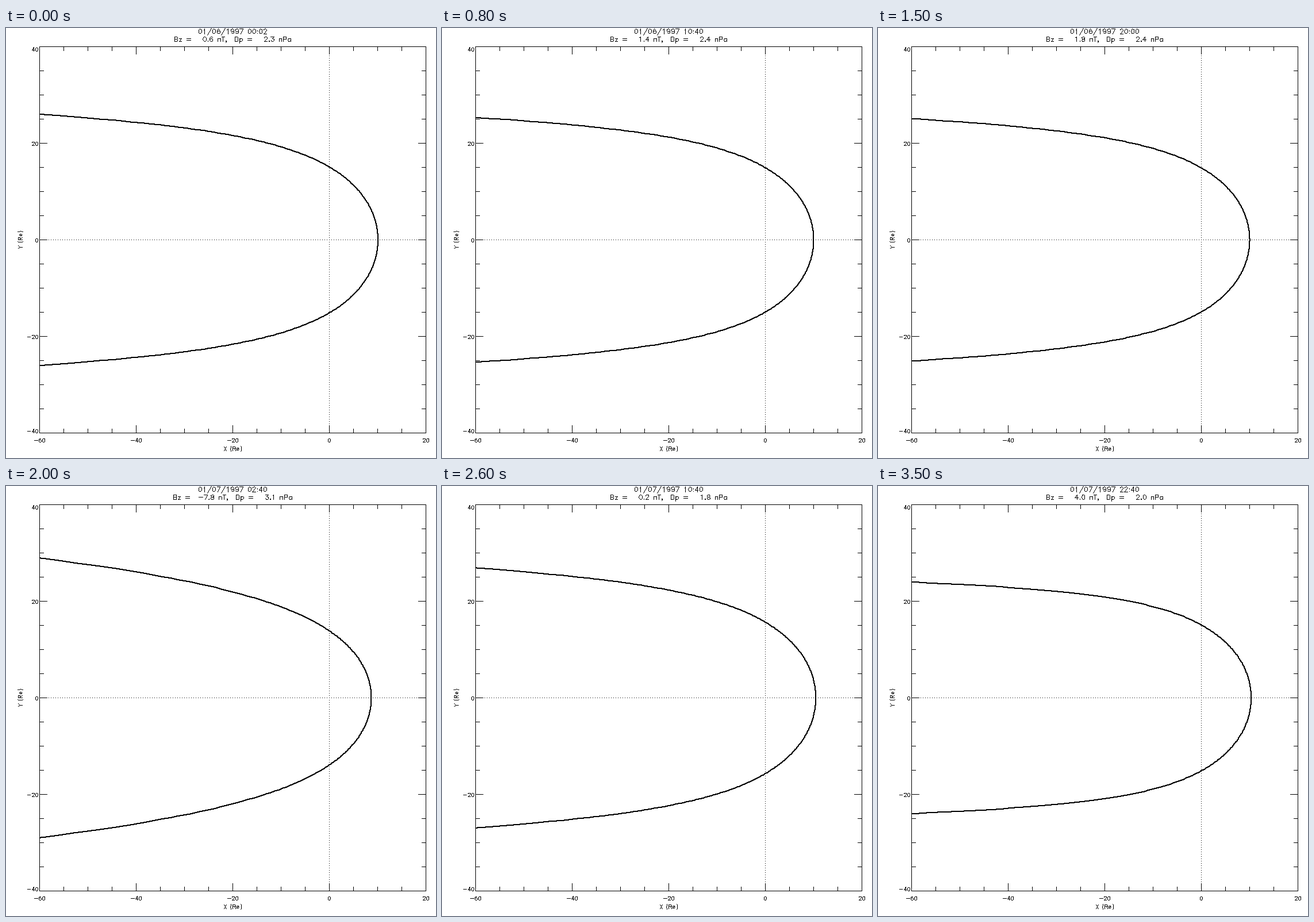
Write a matplotlib script that moves like this. It is 748x748 px and loops after 3.6 s.

```python
import numpy as np
import matplotlib.pyplot as plt
from matplotlib.animation import FuncAnimation

SIZE, DPI, FRAMES = 748, 64, 36
LEFT, TOP, SIDE = 58, 32, 672              # plot box in pixels
RIGHT, BOTTOM = LEFT + SIDE, TOP + SIDE
UNIT = SIDE / 80                           # pixels per Earth radius
X0, Y0 = LEFT + 60 * UNIT, TOP + 40 * UNIT
SMALL, LARGE = 0.31, 0.39                  # lettering scales
STAGE = (0, 0, SIZE - 1, SIZE - 1)
INSIDE = (LEFT + 1, TOP + 1, RIGHT - 1, BOTTOM - 1)

# step, field Bz (nT), pressure Dp (nPa); linear in between
KEYS = np.array([(0, 0.6, 2.3), (4, -2.6, 2.1), (8, 1.4, 2.4), (11, -1.2, 2.2),
                 (15, 1.8, 2.4), (18, 1.2, 1.6), (20, -7.8, 3.1), (23, 3.3, 2.8),
                 (24, 2.6, 1.5), (28, -2.2, 2.1), (30, -1.8, 2.2), (35, 4.0, 2.0)])


def trace(img, points, pen=1, area=STAGE):
    """Draw a polyline without smoothing; pen is the width in pixels."""
    pts = np.asarray(points, float)
    x0, y0, x1, y1 = area
    for a, b in zip(pts, pts[1:]):
        n = int(np.abs(b - a).max()) + 1
        x, y = np.floor(np.linspace(a, b, n) + 0.5).astype(int).T
        for dx in range(pen):
            for dy in range(pen):
                u, v = x - dx, y - dy
                ok = (u >= x0) & (u <= x1) & (v >= y0) & (v <= y1)
                img[v[ok], u[ok]] = 0


# ---- stroke lettering on a small grid of named lines ----
L, C, S, R = 3, 10, 15, 17                 # left, centre, small right, right
B, M, X, T = 0, 10.5, 14, 21               # base, middle, x-height, top


def bow(left, right, low, high, start=0, end=360):
    """Arc of the ellipse that fills the given cell."""
    a = np.radians(np.linspace(start, end, max(4, int(abs(end - start) / 24)) + 1))
    x = (left + right) / 2 + (right - left) / 2 * np.cos(a)
    y = (low + high) / 2 + (high - low) / 2 * np.sin(a)
    return list(zip(x, y))


def bowl(low, high):
    """Half-round closed towards the left stem."""
    return [(L, high)] + bow(C, R, low, high, 90, -90) + [(L, low)]


def bar(y):
    return [(4, y), (22, y)]


STEM = [(L, B), (L, T)]
SIX = bow(L, R, B, T, 45, 180) + bow(L, R, B, X - 1, 180, 540)
NINE = [(L + R - x, T - y) for x, y in SIX]
PAREN = bow(L, R, -7, 25, 120, 240)
POINT, POINT_UP = bow(4, 6, 0, 2), bow(4, 6, 12, 14)

GLYPHS = {
    " ": [],
    "0": [bow(L, R, B, T)],
    "1": [[(L + 3, X + 3), (C, T), (C, B)]],
    "2": [bow(L, R, M, T, 180, -30) + [(L, B), (R, B)]],
    "3": [[(L, T), (R, T), (C, M + 2)] + bow(L, R, B, M + 2, 80, -160)],
    "4": [[(S - 2, B), (S - 2, T), (L, 7), (R, 7)]],
    "5": [[(S, T), (L + 2, T), (L + 1, M + 1)] + bow(L, R, B, X, 130, -150)],
    "6": [SIX],
    "7": [[(L, T), (R, T), (7, B)]],
    "8": [bow(L + 1, R - 1, M, T), bow(L, R, B, M)],
    "9": [NINE],
    "/": [[(20, 25), (2, -7)]],
    ":": [POINT, POINT_UP],
    ".": [POINT],
    ",": [POINT, [(6, 1), (4, -4)]],
    "-": [bar(9)],
    "=": [bar(6), bar(12)],
    "(": [PAREN],
    ")": [[(14 - x, y) for x, y in PAREN]],
    "B": [STEM, bowl(M, T), bowl(B, M)],
    "D": [STEM, [(L, T)] + bow(L, R, B, T, 90, -90) + [(L, B)]],
    "P": [STEM, bowl(M, T)],
    "R": [STEM, bowl(M, T), [(C, M), (R, B)]],
    "T": [[(8, T), (8, B)], [(1, T), (S, T)]],
    "X": [[(L, T), (R, B)], [(R, T), (L, B)]],
    "Y": [[(1, T), (9, M), (9, B)], [(R, T), (9, M)]],
    "a": [[(S, X), (S, B)], bow(L, S, B, X)],
    "e": [[(L, 8), (S, 8)] + bow(L, S, B, X, 10, 320)],
    "n": [[(L, X), (L, B)], bow(L, S, 6, X, 180, 0) + [(S, B)]],
    "p": [[(L, X), (L, -7)], bow(L, S, B, X)],
    "z": [[(L, X), (S - 1, X), (L, B), (S - 1, B)]],
}
WIDTHS = {".,:": 10, "()": 14, " zT": 16, "eY": 18, "anp": 19,
          "BDPR": 21, "/": 22, "-=": 26}
ADVANCE = dict.fromkeys(GLYPHS, 20)
for group, width in WIDTHS.items():
    ADVANCE.update(dict.fromkeys(group, width))


def write(img, text, x, y, scale, align=0.5, upright=False):
    """Letter a text with its baseline at y; align 0.5 centres, 1 ends at x."""
    pen = -align * sum(ADVANCE[c] for c in text)
    for c in text:
        for stroke in GLYPHS[c]:
            u, v = ((np.array(stroke) + (pen, 0)) * scale).T
            pts = (x - v, y - u) if upright else (x + u, y - v)
            trace(img, np.floor(np.column_stack(pts)))
        pen += ADVANCE[c]


def make_axes():
    img = np.full((SIZE, SIZE), 255, np.uint8)
    trace(img, [(LEFT, TOP), (RIGHT, TOP), (RIGHT, BOTTOM), (LEFT, BOTTOM), (LEFT, TOP)])
    for k in range(1, 16):
        x, y = LEFT + k * SIDE / 16, TOP + k * SIDE / 16
        size = 13 if k % 4 == 0 else 7
        trace(img, [(x, TOP), (x, TOP + size)])
        trace(img, [(x, BOTTOM), (x, BOTTOM - size)])
        trace(img, [(LEFT, y), (LEFT + size, y)])
        trace(img, [(RIGHT, y), (RIGHT - size, y)])
    img[int(Y0), LEFT:RIGHT:4] = 0
    img[BOTTOM:TOP:-4, int(X0)] = 0

    for k in range(5):
        d = k * 20 * UNIT
        write(img, str(20 * k - 60), LEFT + 0.5 + d, 720.5, SMALL)
        base = np.clip(TOP + d + 4.5, 40.5, BOTTOM + 0.5)
        write(img, str(40 - 20 * k), 56.5, base, SMALL, align=1)
    write(img, "X (Re)", 394.5, 735, SMALL)
    write(img, "Y (Re)", 28, 368.5, SMALL, upright=True)
    return img


THETA = np.radians(np.arange(-165, 166))


def boundary(bz, dp):
    """Magnetopause shape for a given field and pressure."""
    r0 = (11.4 + (0.013 if bz >= 0 else 0.14) * bz) * dp ** (-1 / 6.6)
    flare = (0.58 - 0.010 * bz) * (1 + 0.010 * dp)
    r = r0 * (2 / (1 + np.cos(THETA))) ** flare
    return r * np.cos(THETA), r * np.sin(THETA)


fig = plt.figure(figsize=(SIZE / DPI, SIZE / DPI), dpi=DPI, facecolor="white")
ax = fig.add_axes([0, 0, 1, 1])
ax.axis("off")
axes_image = make_axes()
view = ax.imshow(axes_image, cmap="gray", vmin=0, vmax=255,
                 interpolation="nearest", aspect="auto")


def draw(i):
    bz, dp = (np.interp(i, KEYS[:, 0], KEYS[:, c]) for c in (1, 2))
    img = axes_image.copy()
    x, y = boundary(bz, dp)
    path = np.column_stack([X0 + 0.5 + x * UNIT, Y0 + 0.5 - y * UNIT])
    trace(img, np.round(path), pen=2, area=INSIDE)

    minutes = max(2, 80 * i)
    day, rest = divmod(minutes, 1440)
    stamp = f"01/{6 + day:02d}/1997 {rest // 60:02d}:{rest % 60:02d}"
    write(img, stamp, 394.5, 10, LARGE)
    write(img, f"Bz = {bz:5.1f} nT,  Dp = {dp:5.1f} nPa", 394.5, 23.5, LARGE)
    view.set_data(img)
    return view,


anim = FuncAnimation(fig, draw, frames=FRAMES, interval=100,
                     repeat=True, repeat_delay=0, blit=False)
plt.show()
```
